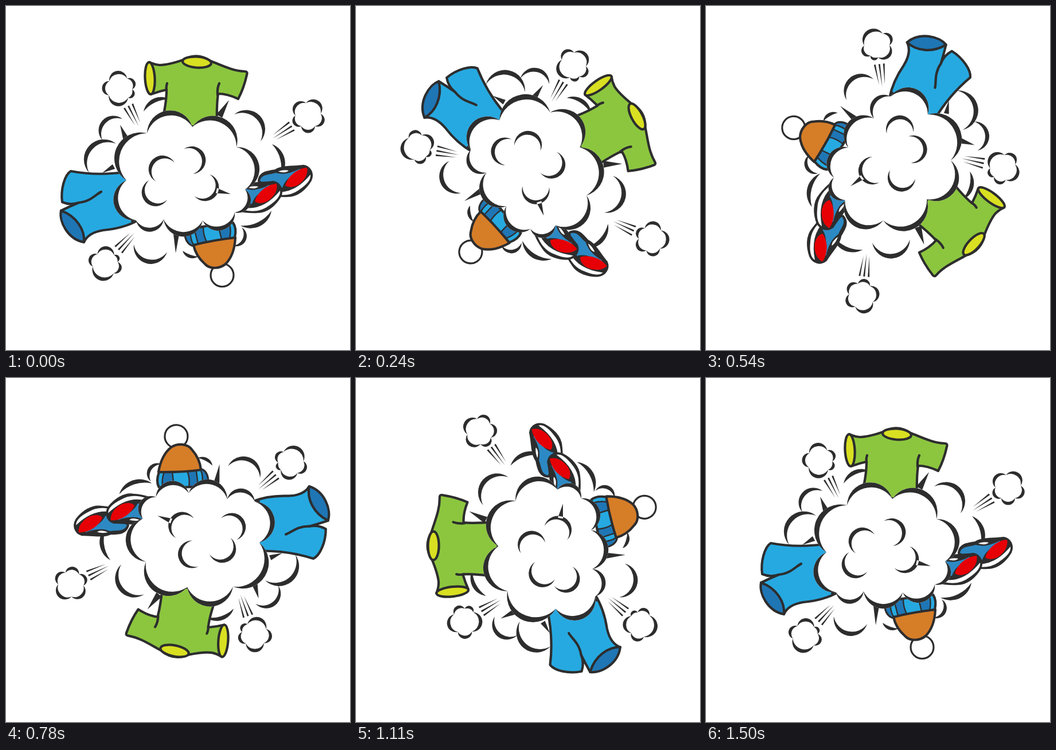
These frames come from a looping animation (600 px wide and 600 px high, 1.53 s). An HTML page:

```html
<!DOCTYPE html>
<html lang="en">
<head>
<meta charset="utf-8">
<style>
  html, body { margin: 0; height: 100%; overflow: hidden; background: #fff; }
  svg { display: block; width: 100vw; height: 100vh; }
  .line { stroke: #2d2d2e; stroke-width: 4.2; stroke-linejoin: round; stroke-linecap: round; }
  .thin { stroke-width: 2.4; }
  .none { fill: none; }
  .ink { fill: #2d2d2e; }
  .white { fill: #fff; }
  .green { fill: #8cc63e; }
  .yellow { fill: #d9e021; }
  .blue { fill: #26a9e1; }
  .navy { fill: #1f76b5; }
  .denim { fill: #2d89c3; }
  .red { fill: #e60005; }
  .orange { fill: #d67d28; }
</style>
</head>
<body>
<svg viewBox="0 0 600 600">
  <g id="brawl">
    <path id="back" class="ink"/>

    <g id="shirt" class="line">
      <path class="green" d="M309 94Q282 103 268 103Q258 102 250 98L253 154Q266 149 280 146Q280 172 270 210H368Q367 172 370 153Q386 153 405 162Q415 143 420 120Q422 114 416 114C395 113 378 104 357 96Q333 80 309 94Z"/>
      <path class="none" d="M281 135Q279 140 280 148M372 135Q368 143 369 155"/>
      <ellipse class="yellow" cx="251" cy="126" rx="8.5" ry="28" transform="rotate(-3 251 126)"/>
      <ellipse class="yellow" cx="333" cy="98" rx="25" ry="9.5" transform="rotate(4 333 98)"/>
    </g>

    <g id="pants" class="line">
      <path class="blue" d="M113 288Q160 297 212 289L232 373Q205 388 170 391C150 394 140 403 136 412L96 357Q110 350 127 343Q112 348 98 342C95 320 102 295 113 288Z"/>
      <path class="none" d="M127 343C148 341 156 329 166 324M220 375L229 372"/>
      <path class="navy" d="M96 357C92 376 108 407 136 412C138 390 122 366 96 357Z"/>
    </g>

    <defs>
      <g id="shoe">
        <path class="ink line" d="M441 305C443 291 455 289 470 287C482 279 500 282 519 279C531 281 536 293 531 304C522 319 508 331 492 331Q475 332 456 328Z"/>
        <path class="white" d="M470 324Q503 328 531 294Q533 306 512 320Q494 334 468 328Z"/>
        <path class="denim" d="M443 305C446 293 458 295 470 291Q490 296 512 284Q516 286 509 291C494 297 486 305 482 317Q460 316 443 305Z"/>
        <path class="white line thin" d="M471 289Q482 283 495 286Q490 295 471 289Z"/>
        <path class="red" d="M487 313C491 297 508 283 525 282C528 295 518 307 508 313Q495 319 487 313Z"/>
      </g>
    </defs>
    <use href="#shoe"/>
    <use href="#shoe" x="-53" y="28"/>

    <g id="hat" class="line">
      <circle class="white" cx="377" cy="469.5" r="20" style="stroke-width:3.2"/>
      <path class="blue" d="M312 396C313 410 320 418 328 418Q362 409 399 404C401 395 401 385 396 378L318 388Z"/>
      <path class="navy thin" d="M312 396C313 410 320 418 328 418Q320 406 322 388ZM335 415L350 411Q344 400 344 386L328 388ZM376 407L390 405Q393 394 390 380L370 382Z"/>
      <path class="orange" d="M327 417Q362 408 400 404C399 425 393 440 383 450C372 459 355 459 347 450Q331 436 327 417Z"/>
    </g>

    <path id="fill" class="white"/>
    <path id="front" class="ink"/>
  </g>
</svg>
<script>
  const polar = (x, y, r, deg) => {
    const a = deg * Math.PI / 180;
    return [x + r * Math.cos(a), y + r * Math.sin(a)];
  };

  // Arc over the chord from p to q whose height is h.
  function arc(p, q, h, sweep) {
    const half = Math.hypot(q[0] - p[0], q[1] - p[1]) / 2;
    const r = (half * half + h * h) / (2 * h);
    return `A${r} ${r} 0 ${+(h > half)} ${sweep} ${q}`;
  }

  // Inked lobe: bend is its height relative to the chord, and longer lobes get a thicker line.
  function crescent(p, q, bend) {
    const chord = Math.hypot(q[0] - p[0], q[1] - p[1]);
    const h = chord * bend, ink = 4 + chord * .06;
    return `M${p}${arc(p, q, h, 1)}${arc(q, p, h - ink, 0)}Z`;
  }
  const ring = (points, bend) =>
    points.map((p, i) => crescent(p, points[(i + 1) % points.length], bend)).join('');
  const arcs = (bend, ...ends) =>
    ends.map(([x1, y1, x2, y2]) => crescent([x1, y1], [x2, y2], bend)).join('');

  function spike(base, tip, width) {
    const k = width / 2 / Math.hypot(tip[0] - base[0], tip[1] - base[1]);
    const dx = (base[1] - tip[1]) * k, dy = (tip[0] - base[0]) * k;
    return `M${base[0] + dx} ${base[1] + dy}L${tip}L${base[0] - dx} ${base[1] - dy}Z`;
  }

  // Small flying puff with notches at the given angles and three speed lines behind it.
  function puff(x, y, tail, notches) {
    let d = ring(notches.map(a => polar(x, y, 22, a)), .5);
    for (let i = -1; i <= 1; i++) {
      const from = polar(...polar(x, y, 34, tail), 8 * i, tail + 90);
      const to = polar(...polar(x, y, 74 - 4 * Math.abs(i), tail), 5 * i, tail + 90);
      d += spike(from, to, 3);
    }
    return d;
  }

  // Round curl inside the cloud, opening away from the given angle.
  const curl = (x, y, deg) =>
    crescent(polar(x, y, 24, deg - 105), polar(x, y, 24, deg + 105), .66);

  const cloud = [[210, 304], [246, 222], [325, 211], [402, 246], [417, 320],
                 [399, 360], [343, 374], [275, 372], [227, 374]];
  const set = (id, d) => document.getElementById(id).setAttribute('d', d);

  set('back',
    arcs(.46, [168, 234, 203, 197], [145, 291, 192, 240], [398, 189, 444, 236],
      [411, 386, 396, 418], [281, 429, 223, 416]) +
    arcs(.26, [240, 184, 286, 163], [464, 241, 478, 298], [463, 357, 409, 383], [335, 437, 308, 427]) +
    spike([372, 192], [389, 164], 12) + spike([211, 236], [199, 207], 12) +
    spike([188, 280], [168, 291], 9) + spike([297, 398], [296, 431], 10) +
    puff(198, 144, 63, [4, 47, 148, 216, 307]) +
    puff(527, 191, 147, [123, 180, 260, 352, 417]) +
    puff(173, 450, -47, [315, 350, 407, 529, 592]));
  set('fill', `M${cloud[0]}` +
    cloud.map((p, i) => {
      const q = cloud[(i + 1) % cloud.length];
      return arc(p, q, Math.hypot(q[0] - p[0], q[1] - p[1]) * .43, 1);
    }).join('') + 'Z');
  set('front', ring(cloud, .43) +
    curl(273, 285, 225) + curl(324, 269, -20) + curl(347, 316, 35) + curl(261, 325, 137) +
    spike([367, 322], [392, 328], 9));

  const STEP = 30, LOOP = 1530, TURN = 7.2;
  const brawl = document.getElementById('brawl');
  function draw() {
    const step = Math.floor(performance.now() % LOOP / STEP);
    brawl.setAttribute('transform', `rotate(${step * TURN} 325.4 288.2)`);
    requestAnimationFrame(draw);
  }
  draw();
</script>
</body>
</html>
```
